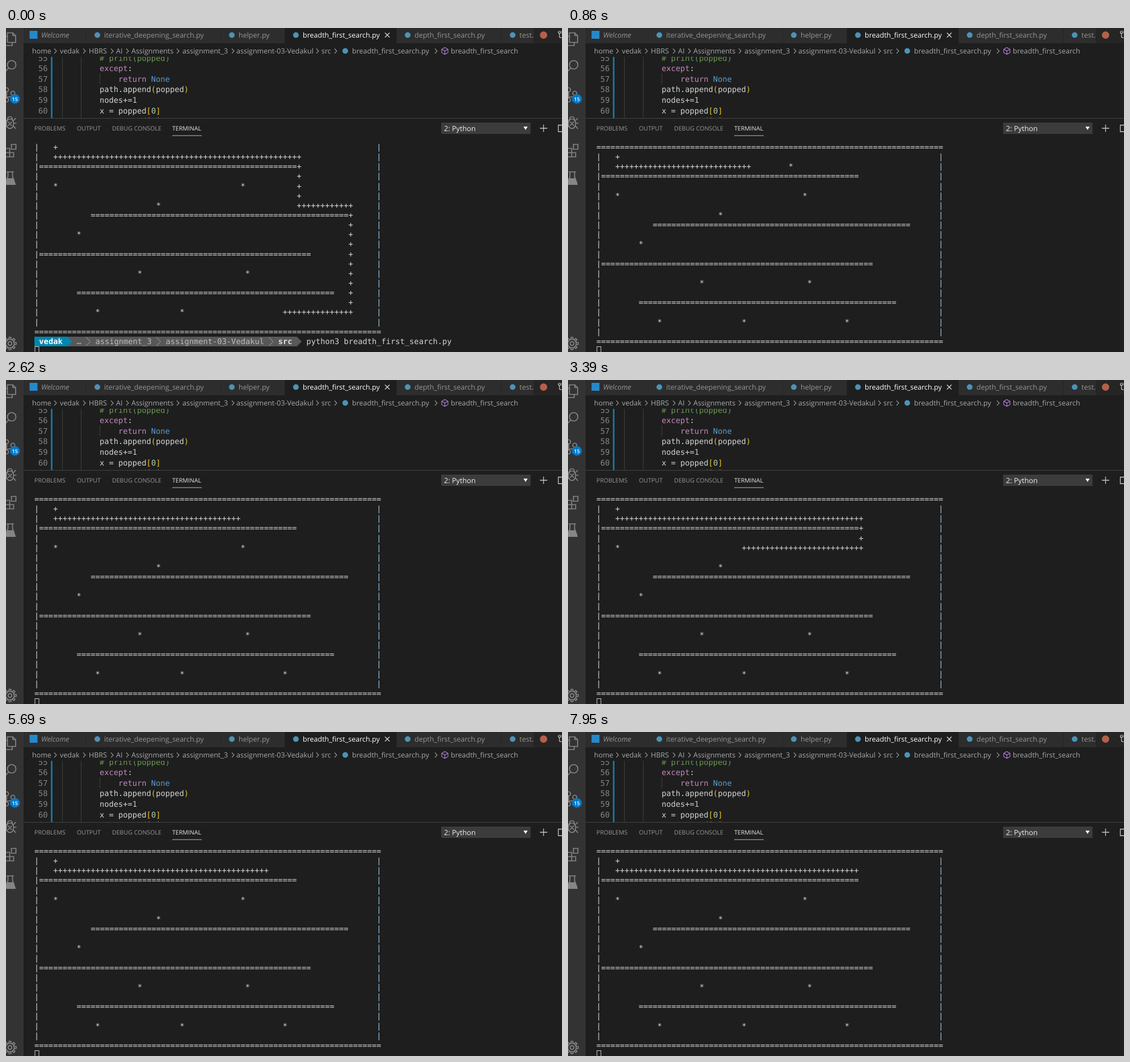
These frames come from a looping animation (980x572 px, 8 s). An HTML page:

```html
<!DOCTYPE html>
<html lang="en">
<head>
<meta charset="utf-8">
<title>Maze search in a terminal</title>
<style>
html, body { margin: 0; width: 100%; height: 100%; overflow: hidden; background: #1e1e1e; }
svg { display: block; }
text { white-space: pre; text-rendering: geometricPrecision; }
.ui { font: 12.5px "Open Sans", "Noto Sans", sans-serif; }
.mono { font: 13.727px "DejaVu Sans Mono", monospace; }
.icon { fill: none; stroke: #868686; stroke-width: 1.7; }
</style>
</head>
<body>
<svg id="stage" width="980" height="572" viewBox="0 0 980 572">
  <defs>
    <clipPath id="editor"><rect x="31" y="51" width="949" height="108"/></clipPath>
    <clipPath id="tabs"><rect x="31" y="0" width="899" height="27"/></clipPath>
  </defs>
  <rect width="980" height="572" fill="#1e1e1e"/>
  <rect width="980" height="27" fill="#252526"/>
  <g id="tabBar" clip-path="url(#tabs)"></g>
  <path d="M668 8.5l8 8m0-8l-8 8" stroke="#ddd" stroke-width="1.2"/>
  <circle cx="947.5" cy="12.5" r="6.5" fill="#b5604a"/>
  <g fill="none" stroke="#c5c5c5" stroke-width="1.2">
    <circle cx="975.5" cy="7.5" r="2"/><path d="M975.5 9.5V15q0 2 2 2h3M980 5v5"/>
  </g>
  <g id="crumbs"></g>
  <g clip-path="url(#editor)">
    <path d="M99.5 51V159M132.5 51V159M165.5 80V99" stroke="#404040"/>
    <rect x="79" y="51" width="3" height="108" fill="#1b6ea0"/>
    <g id="code"></g>
  </g>
  <path d="M31 159.5H980" stroke="#444"/>
  <g id="panel"></g>
  <path d="M293 190H345" stroke="#c0c0c0"/>
  <rect x="767" y="167" width="157.5" height="20" fill="#3c3c3c"/>
  <text class="ui" x="772" y="182" fill="#f0f0f0" style="font-size:12.7px">2: Python</text>
  <path d="M912 174h7.5l-3.75 6z" fill="#f0f0f0"/>
  <path d="M941 177H954M947.5 170.5V183.5" stroke="#c5c5c5" stroke-width="1.3"/>
  <path d="M981 171.5H973.5V183H981" fill="none" stroke="#c5c5c5" stroke-width="1.3"/>

  <rect width="31" height="572" fill="#333"/>
  <g class="icon">
    <path d="M2.5 25.5V8.5H12L17 13.5V25.5H2.5M12 8.5V13.5H17M-2 14.5H2.5M-2 31H11V25.5"/>
    <circle cx="10" cy="65" r="7.5"/><path d="M5 70.5L-2 78"/>
    <circle cx="1" cy="109" r="3.5"/><circle cx="12" cy="115" r="3.5"/><circle cx="1" cy="127" r="3.5"/>
    <path d="M1 112.5V123.5M12 118.5Q11 122 1 122"/>
    <ellipse cx="7" cy="169" rx="6.5" ry="8.5"/>
    <path d="M2.5 162Q3 156.5 7 156.5T11.5 162M.5 168H-3M13.5 168H18.5M1 173L-3 178M13 173L17.5 178M1.5 164L-3 159M12.5 164L17.5 159M3.5 165.5l7 7m0-7l-7 7"/>
    <path d="M-3 212.5H6.5V227.5H-3M-3 220H13.5V227.5H6M9.5 205.5H17.5V214H9.5Z"/>
    <path d="M1 254H14M3.5 254V262L-2 276H16L11.5 262V254"/>
    <path d="M2 266H13L16 276H-1Z" fill="#868686"/>
    <circle cx="7" cy="557" r="3.3"/>
    <g id="gear"></g>
  </g>
  <rect x="7" y="117" width="17.5" height="16.5" rx="8.25" fill="#007acc"/>
  <text class="ui" x="15.7" y="128.5" text-anchor="middle" fill="#fff" style="font-size:9px;font-weight:600">15</text>

  <g id="prompt"></g>
  <g id="rows"></g>
  <rect x="51" y="562.5" width="7" height="16" fill="none" stroke="#ccc"/>
</svg>
<script>
const $ = id => document.getElementById(id);
const add = (id, markup) => $(id).insertAdjacentHTML('beforeend', markup);
const label = (x, y, s, fill, cls = 'ui', style = '') =>
  `<text class="${cls}" x="${x}" y="${y}" fill="${fill}" style="${style}">${s}</text>`;
const dot = (x, y) => `<circle cx="${x}" cy="${y}" r="5" fill="#4b93b8"/>`;

// Tabs: left, right, text x, title
[[31, 141, 62, 'Welcome'], [142, 378, 173, 'iterative_deepening_search.py'],
 [379, 491, 410, 'helper.py'], [492, 688, 523, 'breadth_first_search.py'],
 [689, 873, 720, 'depth_first_search.py'], [874, 931, 905, 'test.py']
].forEach(([l, r, x, title], i) => {
  const active = i === 3;
  add('tabBar', `<rect x="${l}" width="${r - l}" height="27" fill="${active ? '#1e1e1e' : '#2d2d2d'}"/>`
    + (i ? dot(x - 12, 12.5) : '<rect x="41.5" y="5" width="14" height="14" fill="#2489ca"/>')
    + label(x, 17, title, active ? '#fff' : '#969696', 'ui', i ? '' : 'font-style:italic'));
});

[[46, 'home'], [95, 'vedak'], [146, 'HBRS'], [194, 'AI'], [221, 'Assignments'],
 [311, 'assignment_3'], [406, 'assignment-03-Vedakul'], [556, 'src'],
 [610, 'breadth_first_search.py'], [784, 'breadth_first_search']
].forEach(([x, s]) => add('crumbs', label(x, 45, s, '#a9a9a9')));
for (const x of [85, 136, 185, 212, 301, 398, 547, 579, 756])
  add('crumbs', `<path d="M${x} 36.5l4 4.2-4 4.2" fill="none" stroke="#a0a0a0" stroke-width="1.1"/>`);
add('crumbs', dot(598, 40.5)
  + '<path d="M773.5 34.5l5.5 3v6l-5.5 3-5.5-3v-6zM768 37.5l5.5 3 5.5-3M773.5 40.5v6" fill="none" stroke="#b180d7" stroke-width="1.1"/>');

const span = (fill, s) => `<tspan fill="${fill}">${s}</tspan>`;
const gold = s => span('#e8c51c', s);
[[165, span('#6a9955', '# print(popped)')],
 [165, span('#c586c0', 'except') + ':'],
 [198, span('#c586c0', 'return') + ' ' + span('#569cd6', 'None')],
 [165, 'path.append' + gold('(') + 'popped' + gold(')')],
 [165, 'nodes+=' + span('#b5cea8', '1')],
 [165, 'x = popped' + gold('[') + span('#b5cea8', '0') + gold(']')],
 [165, 'y = popped' + gold('[') + span('#b5cea8', '1') + gold(']')]
].forEach(([x, s], i) => {
  const y = 57.5 + i * 18.6;
  add('code', label(57, y, 55 + i, '#858585', 'mono') + label(x, y, s, '#d4d4d4', 'mono'));
});

[[50, 'PROBLEMS'], [125, 'OUTPUT'], [187, 'DEBUG CONSOLE'], [293, 'TERMINAL']].forEach(([x, s], i) =>
  add('panel', label(x, 181, s, i === 3 ? '#e7e7e7' : '#979797', 'ui', 'font-size:10.6px')));

for (let i = 0; i < 8; i++)
  add('gear', `<path d="M5 549.5L5.5 546H8.5L9 549.5" transform="rotate(${i * 45} 7 557)"/>`);
add('gear', '<circle cx="7" cy="557" r="7.5"/>');

// Terminal grid
const LEFT = 50.1, CELL = 8.264, TOP = 214.9, LINE = 17.15;
const INK = '#d6d6d6';
const colX = c => LEFT + c * CELL;
const rowY = r => TOP + r * LINE;

const promptText = (c, s, fill, style) => label(colX(c), rowY(20), s, fill, 'mono', style);
const arrow = (c, end, fill) =>
  `<path d="M${colX(c)} 545H${colX(end)}L${colX(end + 1)} 553.5L${colX(end)} 562H${colX(c)}Z" fill="${fill}"/>`;
add('prompt', arrow(7, 56, '#585858') + arrow(0, 7, '#0087af')
  + promptText(1, 'vedak', '#fff', 'font-weight:700') + promptText(9, '…', '#bcbcbc')
  + promptText(13, 'assignment_3', '#bcbcbc') + promptText(28, 'assignment-03-Vedakul', '#bcbcbc')
  + promptText(52, 'src', '#e0e0e0', 'font-weight:700')
  + promptText(58, 'python3 breadth_first_search.py', INK));
for (const c of [11, 26, 50])
  add('prompt', `<path d="M${colX(c)} 545.5l7.5 8-7.5 8" fill="none" stroke="#a0a0a0"/>`);

// Maze: walls as row, first column, length; stars as row, column
const walls = [[0, 0, 74], [3, 1, 55], [8, 12, 55], [12, 1, 58], [16, 9, 55], [20, 0, 74]];
const stars = [[2, 41], [5, 4], [5, 44], [7, 26], [10, 9], [14, 22], [14, 45], [18, 13], [18, 31], [18, 53]];

// Expands corner points into every cell on the way
function route(points) {
  let [r, c] = points[0];
  const cells = [[r, c]];
  for (const [r2, c2] of points.slice(1))
    while (r !== r2 || c !== c2) {
      r += Math.sign(r2 - r);
      c += Math.sign(c2 - c);
      cells.push([r, c]);
    }
  return cells;
}
const shortPath = route([[1, 4], [2, 4], [2, 56], [5, 56], [5, 4]]);
const longPath = route([[1, 4], [2, 4], [2, 56], [7, 56], [7, 67], [18, 67], [18, 53]]);

function maze(path) {
  const grid = Array.from({ length: 21 }, (_, r) => {
    const line = Array(74).fill(' ');
    if (r % 20) line[0] = line[73] = '|';
    return line;
  });
  for (const [r, c, n] of walls) grid[r].fill('=', c, c + n);
  for (const [r, c] of stars) grid[r][c] = '*';
  for (const [r, c] of path) grid[r][c] = '+';
  return grid.map(line => line.join(''));
}

// Growth: start ms, end ms, steps, cells at start, cells at end
const bursts = [
  [210, 1010, 15, 0, 38],
  [1760, 2520, 14, 0, 37], [2570, 3340, 15, 40, 78], [3390, 3900, 11, 81, 108],
  [4710, 5490, 14, 0, 39], [5540, 6110, 11, 41, 68],
  [6890, 7650, 15, 0, 38], [7700, 7950, 6, 40, 52]
];
function cellsAt(t) {
  const [a, b, steps, from, to] = bursts.filter(s => t >= s[0]).pop();
  const k = Math.min(1, Math.floor((t - a) / (b - a) * (steps - 1) + 1e-6) / (steps - 1));
  return Math.floor(from + (to - from) * k + 1e-6);
}

const rows = [];
for (let r = 0; r < 21; r++) {
  add('rows', label(LEFT, rowY(r), '', INK, 'mono') + label(colX(73), rowY(r), '', '#a0c8e8', 'mono'));
  rows.push([...$('rows').children].slice(-2));
}
const put = (el, s) => { if (el.textContent !== s) el.textContent = s; };

function draw(t) {
  const done = t < 210;
  const lines = done ? maze(longPath).slice(1) : maze(shortPath.slice(0, 1 + cellsAt(t)));
  rows.forEach(([body, edge], r) => {
    const line = lines[r] || '';
    const bar = line[73] === '|';
    put(body, bar ? line.slice(0, 73) : line);
    put(edge, bar ? '|' : '');
  });
  $('prompt').style.display = done ? '' : 'none';
}

const start = performance.now();
function tick() {
  draw((performance.now() - start) % 8000);
  requestAnimationFrame(tick);
}
tick();
</script>
</body>
</html>
```
